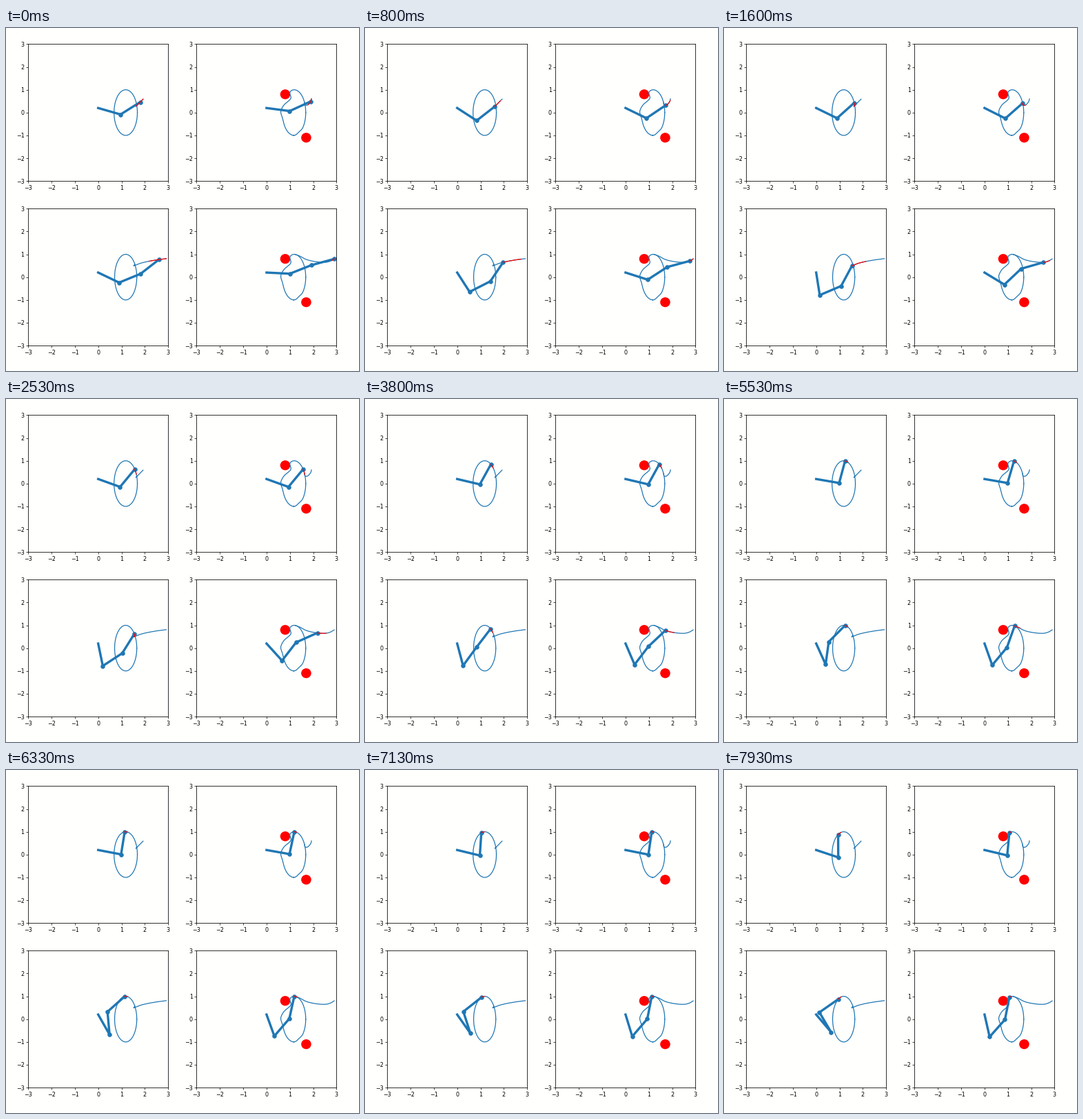
These frames come from a looping animation (512x498 px, 8000 ms). A matplotlib script:

```python
import numpy as np
import matplotlib.pyplot as plt
from matplotlib.animation import FuncAnimation
from matplotlib.patches import Circle

W, H, DPI = 512, 498, 64
PAPER, BLUE, RED = "#fffffd", "#1f77b4", "#ff0000"
BASE = np.array([0.0, 0.2])
OBSTACLES = [(0.8, 0.8), (1.7, -1.1)]
LAST, TAIL = 119, 15                # time is counted in steps of 1/15 s

plt.rcParams.update({
    "font.family": "DejaVu Sans", "font.size": 9,
    "axes.linewidth": 0.9,
    "xtick.major.width": 0.8, "ytick.major.width": 0.8,
    "xtick.major.size": 3.15, "ytick.major.size": 3.15,
    "xtick.major.pad": 3.15, "ytick.major.pad": 3.15,
})


def bump(y, mid, width):
    return np.exp(-((y - mid) / width) ** 2)


def loop(deg, rx, blocked):
    """Target orbit: an ellipse, dented where an obstacle is close."""
    a = np.radians(deg)
    x, y = 1.18 + rx * np.cos(a), np.sin(a)
    if blocked:
        left = 0.25 * bump(y, 0.62, 0.22) - 0.07 * bump(y, 0.03, 0.2)
        right = -0.06 * bump(y, -0.89, 0.12)
        x = x + np.where(np.cos(a) < 0, left, right)
    return x, y


def pace(s, blocked):
    """Angle on the orbit; the obstacle slows the hand down."""
    return -4.2 + 1.237 * s - 0.0026 * s * s if blocked else 1.9 + 0.98 * s


def tilt_free(s):
    return 1.212 - 0.00498 * s - 0.54 * bump(s, 0, 11)


def tilt_blocked(s):
    u = np.clip((s - 18) / 84, 0, 1)
    return 0.27 + 1.11 * u * u * (3 - 2 * u)


def spline(t, p):
    """Smooth curve through points p at times t."""
    m = np.gradient(p, t, axis=0)

    def at(s):
        s = np.clip(np.atleast_1d(s), t[0], t[-1])
        i = np.clip(np.searchsorted(t, s, "right") - 1, 0, len(t) - 2)
        h = (t[i + 1] - t[i])[:, None]
        u = (s - t[i])[:, None] / h
        return ((1 + 2 * u) * (1 - u) ** 2 * p[i] + u * (1 - u) ** 2 * h * m[i]
                + u * u * (3 - 2 * u) * p[i + 1] + u * u * (u - 1) * h * m[i + 1])

    return at


def elbow(p):
    """Joint between the base and p for two unit links, bent downwards."""
    d = p - BASE
    r = min(np.hypot(*d), 2.0)
    h = np.sqrt(1 - r * r / 4)
    return BASE + d / 2 + h * np.array([d[1], -d[0]]) / r


fig = plt.figure(figsize=(W / DPI, H / DPI), dpi=DPI, facecolor=PAPER)


class Panel:
    """An arm whose hand follows the approach points, then joins the orbit."""

    def __init__(self, left, top, approach, join, rx=0.5, tilt=None,
                 blocked=False):
        approach = np.array(approach)
        orbit_t = np.arange(join, LAST + 9, 8.0)
        orbit = np.transpose(loop(pace(orbit_t, blocked), rx, blocked))
        self.hand = spline(np.append(approach[:, 0], orbit_t),
                           np.vstack([approach[:, 1:], orbit]))
        self.first, self.tilt = approach[0, 0], tilt

        w, h = 203, 198.8
        ax = fig.add_axes([left / W, 1 - (top + h) / H, w / W, h / H],
                          facecolor=PAPER)
        ax.set(xlim=(-3, 3), ylim=(-3, 3),
               xticks=range(-3, 4), yticks=range(-3, 4))
        line = dict(color=BLUE, lw=1.4)
        ax.plot(*loop(np.linspace(0, 360, 400), rx, blocked), **line)
        ax.plot(*self.hand(np.linspace(self.first, join, 200)).T, **line)
        if blocked:
            for spot in OBSTACLES:
                ax.add_patch(Circle(spot, 0.215, color=RED, lw=0))
            if tilt:
                ax.plot([2.98, 2.98], [0.75, 0.86], **line)
        self.arm, = ax.plot([], [], "-o", color=BLUE, lw=3.8, ms=6.8,
                            mew=0.5, markevery=slice(1, None))
        self.tail, = ax.plot([], [], color=RED, lw=1.35)

    def pose(self, s):
        tip = self.hand(s)[0]
        if self.tilt:
            a = self.tilt(s)
            wrist = tip - [np.cos(a), np.sin(a)]
            joints = [BASE, elbow(wrist), wrist, tip]
        else:
            joints = [BASE, elbow(tip), tip]
        self.arm.set_data(*np.transpose(joints))
        start = max(s - TAIL, -7)
        self.tail.set_data(*self.hand(np.linspace(start, start + TAIL, 40)).T)
        return self.arm, self.tail


# Approach points are (step, x, y)
COLS, ROWS = (32.2, 276.4), (23.4, 262.3)
panels = [
    Panel(COLS[0], ROWS[0],
          [(-7, 1.925, .59), (0, 1.80, .46), (10, 1.615, .27)], join=17),
    Panel(COLS[1], ROWS[0],
          [(-7, 1.925, .60), (0, 1.897, .49), (9, 1.765, .335),
           (17, 1.655, .33)], join=26, blocked=True),
    Panel(COLS[0], ROWS[1],
          [(-7, 2.92, .81), (0, 2.603, .77), (16, 1.79, .60), (23, 1.55, .50)],
          join=34, rx=0.475, tilt=tilt_free),
    Panel(COLS[1], ROWS[1],
          [(-1, 2.90, .80), (9, 2.79, .727), (24, 2.53, .65), (38, 2.176, .667),
           (57, 1.706, .772), (72, 1.456, .907)],
          join=90, tilt=tilt_blocked, blocked=True),
]


def draw(n):
    s = min(-(-24 * n // 25), LAST)     # 64 ms frames to 15 steps a second
    return [artist for p in panels for artist in p.pose(s)]


anim = FuncAnimation(fig, draw, frames=125, interval=64, repeat=True,
                     repeat_delay=0, blit=False)
plt.show()
```
